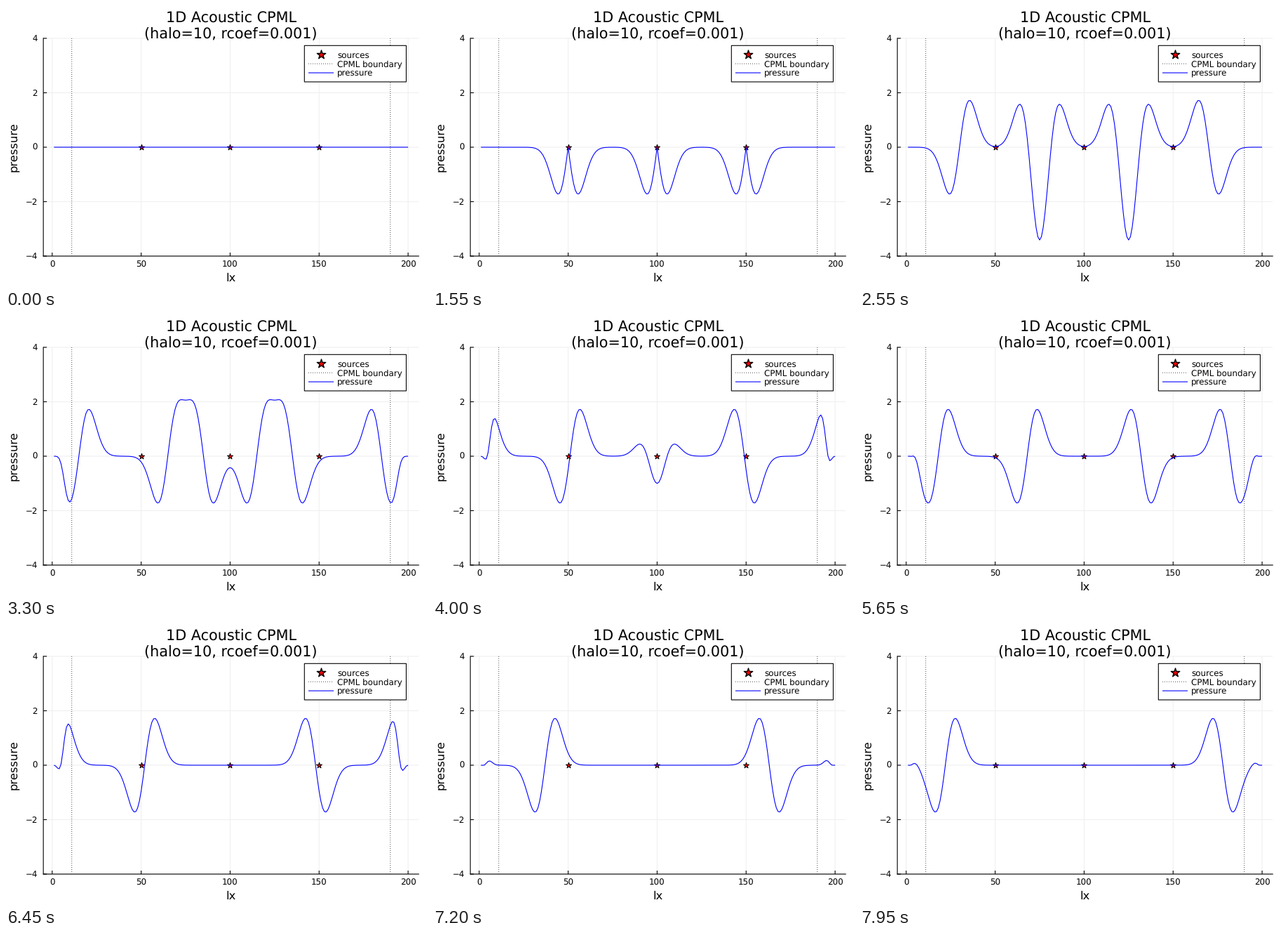
A matplotlib script for the animation above (8 s loop, 600x400 px).

```python
import numpy as np
import matplotlib.pyplot as plt
from matplotlib.animation import FuncAnimation
from matplotlib.patches import Rectangle

W, H, DPI = 600, 400, 100
PT = 72 / DPI                      # points per pixel
FRAMES, INTERVAL = 160, 50
NX, HALO, RCOEF = 200, 10, 0.001
SOURCES = (50, 100, 150)
F0 = 0.04                          # dominant frequency, cycles per step
T0 = 1.2 / F0                      # ricker delay, steps
LEFT, RIGHT, TOP, BOTTOM = 53.2, 588.2, 46, 356
MID = (LEFT + RIGHT) / 2

plt.rcParams["font.family"] = "DejaVu Sans"
plt.rcParams["text.hinting"] = "none"


def px(x):
    return LEFT + (x + 4.97) * (RIGHT - LEFT) / 210.94


def py(p):
    return 201 - 38.75 * p


def ricker(t):
    q = (np.pi * F0 * (t - T0)) ** 2
    return (1 - 2 * q) * np.exp(-q)


def cpml(pos):
    """Recursion coefficients a, b at the given grid positions."""
    edge = HALO + 1
    depth = np.maximum(np.maximum(edge - pos, pos - (NX - 1 - edge)), 0) / HALO
    d = -3 * np.log(RCOEF) / (2 * HALO) * depth ** 2
    alpha = np.pi * F0 * np.maximum(1 - depth, 0)
    b = np.exp(-(d + alpha))
    return d * (b - 1) / (d + alpha), b


def simulate(steps):
    """Leapfrog acoustic wave at Courant number 1 with absorbing ends."""
    nodes = np.arange(NX)
    a, b = cpml(nodes[1:-1])
    ah, bh = cpml(nodes[:-1] + 0.5)
    src = np.array(SOURCES) - 1
    p, old = np.zeros(NX), np.zeros(NX)
    psi, xi = np.zeros(NX - 1), np.zeros(NX - 2)
    states = [p]
    for n in range(steps):
        grad = np.diff(p)
        psi = bh * psi + ah * grad
        lap = np.diff(grad) + np.diff(psi)
        xi = b * xi + a * lap
        new = np.zeros(NX)
        new[1:-1] = 2 * p[1:-1] - old[1:-1] + lap + xi
        new[src] += ricker(n)
        old, p = p, new
        states.append(p)
    return states


fig = plt.figure(figsize=(W / DPI, H / DPI), dpi=DPI, facecolor="white")
ax = fig.add_axes([0, 0, 1, 1])
ax.set_xlim(0, W)
ax.set_ylim(H, 0)
ax.axis("off")


def line(xs, ys, color="black", width=1.1, z=1, **kw):
    kw.setdefault("solid_capstyle", "butt")
    return ax.plot(xs, ys, color=color, lw=width * PT, zorder=z,
                   snap=False, **kw)[0]


def label(x, y, s, size, ha="center", **kw):
    ax.text(x, y, s, fontsize=size * PT, ha=ha, va="baseline", zorder=9, **kw)


def dotted(xs, ys, z):
    line(xs, ys, "#505050", 1, z, linestyle=(0, (1, 2)),
         dash_capstyle="butt")


def stars(xs, ys, size, edge, z):
    ax.scatter(xs, ys, s=(size * PT) ** 2, marker="*", fc="red", ec="black",
               linewidths=edge * PT, zorder=z, snap=False)


# grid, ticks and tick labels
for v in range(0, 201, 50):
    x = px(v)
    line([x, x], [TOP, BOTTOM], "#f0f0f0")
    line([x, x], [BOTTOM, BOTTOM - 5], z=3)
    label(x, 371.5, str(v), 11.9)
for v in range(-4, 5, 2):
    y = py(v)
    line([LEFT, RIGHT], [y, y], "#f0f0f0")
    line([LEFT, LEFT + 5], [y, y], z=3)
    label(45, y + 4.3, str(v).replace("-", "\u2212"), 11.9, "right")
line([LEFT, LEFT], [TOP, BOTTOM], z=3, solid_capstyle="projecting")
line([LEFT, RIGHT], [BOTTOM, BOTTOM], z=3, solid_capstyle="projecting")

# titles
label(MID, 23.7, "1D Acoustic CPML", 20.8)
label(MID, 46.4, "(halo=10, rcoef=0.001)", 20.8)
label(MID, 392, "lx", 16.4)
label(16, 201, "pressure", 16.4, rotation=90, rotation_mode="anchor")

# data
stars([px(s) for s in SOURCES], [py(0)] * 3, 8.4, 1, 4)
for edge in (HALO + 1, NX - HALO):
    dotted([px(edge)] * 2, [BOTTOM, TOP], 4)
wave = line([], [], "blue", 1.1, 5, solid_joinstyle="round")

# legend
ax.add_patch(Rectangle((425.3, 56.3), 145.1, 51.7, fc="white", ec="black",
                       lw=1.1 * PT, zorder=6, snap=False))
stars([448.8], [69.2], 13, 1.4, 7)
dotted([431, 467], [82.2, 82.2], 7)
line([431, 467], [95.1, 95.1], "blue", 1.1, 7)
for i, name in enumerate(("sources", "CPML boundary", "pressure")):
    label(472, 73.8 + 13 * i, name, 11.9, "left")

states = simulate(FRAMES)
grid_x = px(np.arange(1, NX + 1))


def update(frame):
    wave.set_data(grid_x, py(states[max(frame - 1, 0)]))
    return [wave]


anim = FuncAnimation(fig, update, frames=FRAMES, interval=INTERVAL,
                     init_func=lambda: update(0), repeat=True, repeat_delay=0)
plt.show()
```
